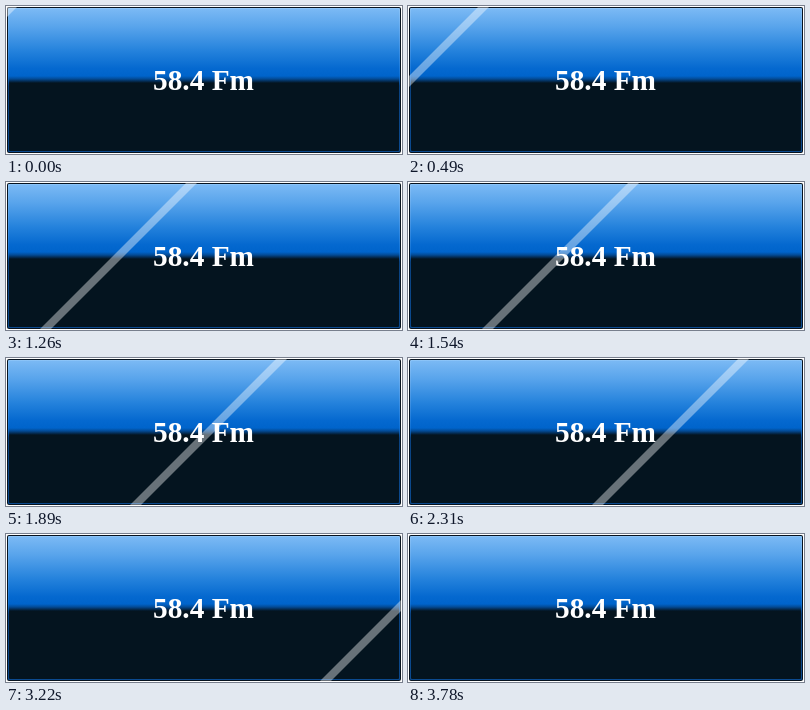
These frames come from a looping animation (396x148 px, 4780 ms). An HTML page with a canvas:

```html
<!DOCTYPE html>
<html lang="en">
<head>
<meta charset="utf-8">
<title>Radio banner</title>
<style>
  html, body { margin: 0; width: 100%; height: 100%; overflow: hidden; background: #fff; }
  canvas { display: block; width: 396px; height: 148px; }
</style>
</head>
<body>
<canvas id="stage" width="396" height="148"></canvas>
<script>
const W = 396, H = 148;
const STEP = 70, LAST = 54, LOOP = 4780;
const ctx = document.getElementById('stage').getContext('2d');

function panel(inset, radius) {
  ctx.beginPath();
  ctx.roundRect(inset, inset, W - 2 * inset, H - 2 * inset, radius);
}

function fade(stops) {
  const g = ctx.createLinearGradient(0, 0, 0, H);
  for (const [y, color] of stops) g.addColorStop(y / H, color);
  return g;
}

const glass = fade([
  [2, '#7cbaf5'], [20, '#5aa5ec'], [45, '#2482dc'], [63, '#0468cf'],
  [70, '#0064cb'], [73, '#034a94'], [77, '#04141f'], [H, '#04141f']
]);
const rim = fade([[2, '#8cc4f8'], [70, '#1172d6'], [80, '#0a4280'], [H, '#0b4a90']]);

function drawCard() {
  ctx.fillStyle = '#fff';
  ctx.fillRect(0, 0, W, H);
  panel(1, 2);
  ctx.fillStyle = '#06121e';
  ctx.fill();
  panel(2, 1);
  ctx.fillStyle = rim;
  ctx.fill();
  panel(3, 1);
  ctx.fillStyle = glass;
  ctx.fill();
}

function drawLabel() {
  ctx.font = 'bold 29.33px "Liberation Serif", "Times New Roman", serif';
  ctx.textAlign = 'center';
  ctx.textBaseline = 'alphabetic';
  ctx.fillStyle = '#fff';
  ctx.fillText('58.4 Fm', 197.5, 84);
}

// Diagonal band between the lines x + y = a and x + y = b
function drawGlint(step) {
  const a = step * 10 + 1, b = a + 11;
  ctx.save();
  panel(1, 2);
  ctx.clip();
  ctx.beginPath();
  ctx.moveTo(a, 0);
  ctx.lineTo(b, 0);
  ctx.lineTo(b - H, H);
  ctx.lineTo(a - H, H);
  ctx.closePath();
  ctx.fillStyle = 'rgba(255, 255, 255, 0.4)';
  ctx.fill();
  ctx.restore();
}

const start = performance.now();

function frame() {
  const t = (performance.now() - start) % LOOP;
  const step = Math.min(LAST, Math.floor(t / STEP));
  drawCard();
  drawLabel();
  if (step < LAST) drawGlint(step);
  requestAnimationFrame(frame);
}
frame();
</script>
</body>
</html>
```
